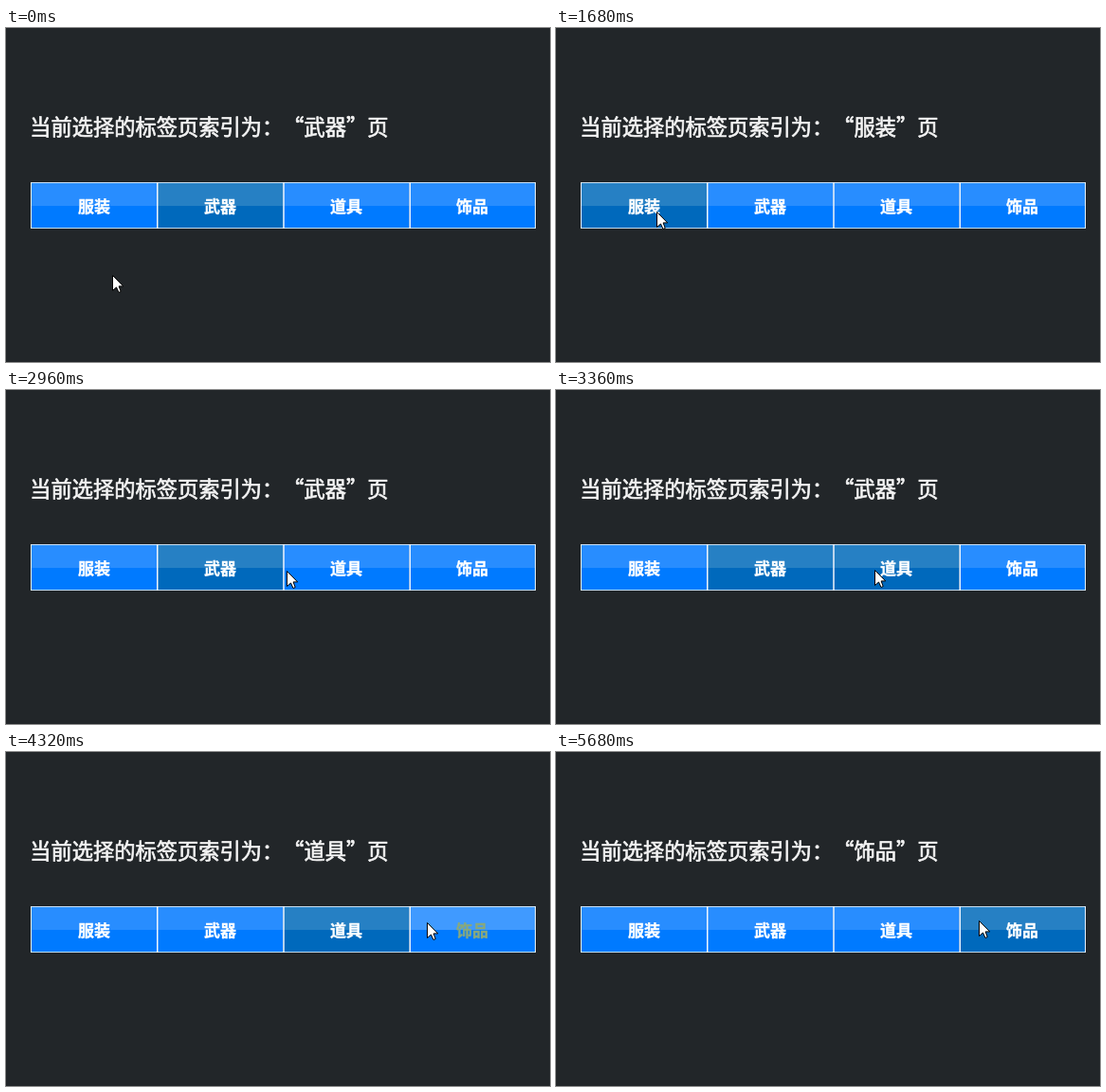
Recreate the animation shown at these times as an HTML page with a canvas. Size 574 by 353 pixels, loop 5760 ms.

```html
<!DOCTYPE html>
<html lang="zh-CN">
<head>
<meta charset="utf-8">
<style>
  html, body { margin: 0; width: 100%; height: 100%; overflow: hidden; background: #222629; }
  canvas { display: block; }
</style>
</head>
<body>
<canvas id="stage" width="574" height="353"></canvas>
<script>
const ctx = document.getElementById('stage').getContext('2d');
const FONT = '"Noto Sans CJK SC", "Noto Sans CJK", sans-serif';
const LOOP = 5760, TICK = 80;
const LEFT = 26, TOP = 163, TAB_W = 133.25, TAB_H = 49;
const tabs = ['服装', '武器', '道具', '饰品'];

const looks = {
  normal:   { top: '#288dff', bottom: '#007aff', text: '#fff' },
  hover:    { top: '#409aff', bottom: '#007aff', text: '#88a97e' },
  selected: { top: '#2680c4', bottom: '#0069bc', text: '#fff' }
};

// Pointer moves, eased from wherever the previous one ended; bend bows the path downwards
const home = { x: 112, y: 261 };
const moves = [
  { from: 720,  to: 1100, x: 101, y: 188, bend: 0 },
  { from: 1600, to: 2200, x: 212, y: 193, bend: 35 },
  { from: 2720, to: 3107, x: 336, y: 190, bend: 0 },
  { from: 3725, to: 4300, x: 444, y: 180, bend: 0 },
  { from: 4560, to: 4640, x: 445, y: 180, bend: 0 },
  { from: 5520, to: 5680, x: 446, y: 178, bend: 0 }
];

// The tab darkens on press; the page follows a little later
const clicks = [
  { press: 0,    open: 0,    tab: 1 },
  { press: 1280, open: 1440, tab: 0 },
  { press: 2480, open: 2560, tab: 1 },
  { press: 3360, open: 3440, tab: 2 },
  { press: 4400, open: 4480, tab: 3 }
];

const lastTab = (t, key) => clicks.filter(c => c[key] <= t).pop().tab;

function pointerAt(t) {
  let { x, y } = home;
  for (const m of moves) {
    const k = Math.min(1, Math.max(0, (t - m.from) / (m.to - m.from)));
    const e = k * k * (3 - 2 * k);
    x += (m.x - x) * e;
    y += (m.y - y) * e + m.bend * Math.sin(Math.PI * e);
  }
  return { x: Math.round(x), y: Math.round(y) };
}

function tabUnder({ x, y }) {
  return y >= TOP && y < TOP + TAB_H ? Math.floor((x - LEFT) / TAB_W) : -1;
}

function rect(color, x, y, w, h) {
  ctx.fillStyle = color;
  ctx.fillRect(x, y, w, h);
}

// A thin outline in the same colour gives the lettering its weight
function label(text, x, y, font, align, color, weight) {
  ctx.font = font + ' ' + FONT;
  ctx.textAlign = align;
  ctx.fillStyle = ctx.strokeStyle = color;
  ctx.lineWidth = weight;
  ctx.lineJoin = 'round';
  ctx.fillText(text, x, y);
  ctx.strokeText(text, x, y);
}

function drawTab(i, look) {
  const x = LEFT + i * TAB_W;
  rect(look.top, x, TOP, TAB_W, 25);
  rect(look.bottom, x, TOP + 25, TAB_W, TAB_H - 25);
  label(tabs[i], LEFT + i * 133 + 67, 195, 'bold 17px', 'center', look.text, 0.35);
}

function drawBorders() {
  const right = LEFT + tabs.length * TAB_W;
  for (const y of [TOP, TOP + TAB_H - 1]) rect('rgba(255,255,255,.75)', LEFT, y, right - LEFT, 1);
  for (const x of [LEFT, right - 1]) rect('#e6f1ff', x, TOP, 1, TAB_H);
  for (let i = 1; i < tabs.length; i++) rect('#f0f6ff', LEFT + i * TAB_W - 0.25, TOP, 1.5, TAB_H);
}

function drawPointer({ x, y }) {
  ctx.save();
  ctx.translate(x + 0.5, y + 0.5);
  ctx.beginPath();
  [[0, 0], [0, 16], [4, 12.5], [6.5, 18], [8.7, 17], [6.6, 11.4], [11.2, 11.4]]
    .forEach(p => ctx.lineTo(...p));
  ctx.closePath();
  ctx.fillStyle = '#fff';
  ctx.strokeStyle = '#000';
  ctx.lineWidth = 1;
  ctx.fill();
  ctx.stroke();
  ctx.restore();
}

function draw(now) {
  const t = Math.floor((now % LOOP) / TICK) * TICK;
  const page = lastTab(t, 'open');
  const pressed = lastTab(t, 'press');
  const hovered = tabUnder(pointerAt(t - TICK)); // hover lags one tick

  rect('#222629', 0, 0, 574, 353);
  label('当前选择的标签页索引为：“' + tabs[page] + '”页', 25.2, 113.2, '500 22.25px', 'left', '#f4f4f4', 0.7);
  tabs.forEach((_, i) => drawTab(i,
    i === page || i === pressed ? looks.selected : i === hovered ? looks.hover : looks.normal));
  drawBorders();
  drawPointer(pointerAt(t));
  requestAnimationFrame(() => draw(performance.now() - start));
}

const start = performance.now();
draw(0);
</script>
</body>
</html>
```
